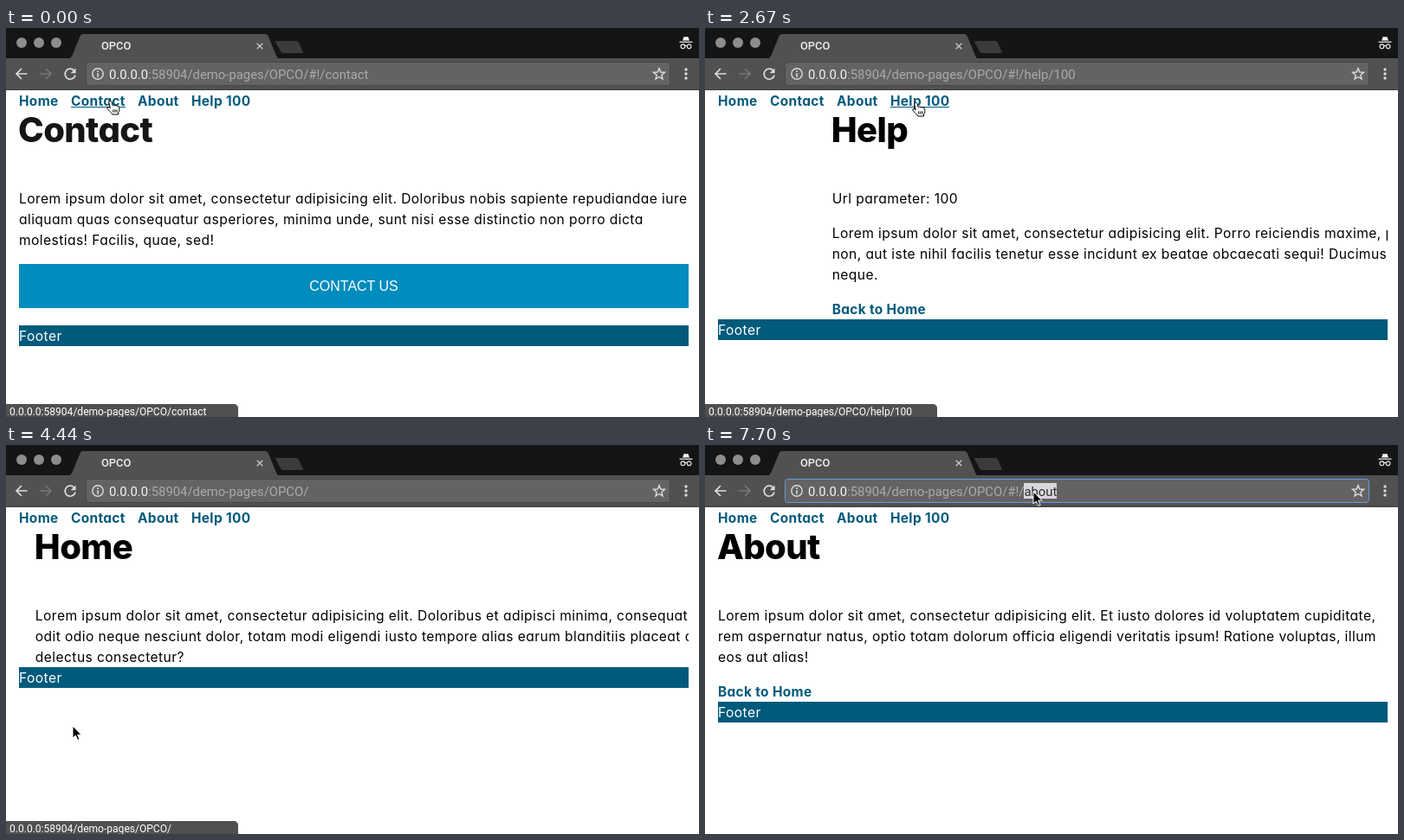
These frames come from a looping animation (800x450 px, 8 s). An HTML page:

```html
<!DOCTYPE html>
<html lang="en">
<head>
<meta charset="utf-8">
<title>One page demo</title>
<style>
  html, body { margin: 0; width: 100%; height: 100%; overflow: hidden; background: #fff; }
  svg { display: block; width: 100vw; height: 100vh; }
  text { white-space: pre; }
  .ui { font-family: Roboto, "Liberation Sans", sans-serif; }
  .body, .bold, .title {
    font-family: Inter, Lato, sans-serif;
    font-feature-settings: "cv11";
    font-optical-sizing: none;
  }
  .body { font-size: 15.6px; letter-spacing: .42px; }
  .bold { font-size: 15.4px; font-weight: 700; letter-spacing: .35px; fill: #005a7c; }
  .title { font-size: 40px; font-weight: 800; letter-spacing: -.6px; }
  .button { font: 16px "Liberation Sans", Arial, sans-serif; fill: #fff; text-anchor: middle; }
  .line { fill: none; stroke: #dcdcdc; stroke-width: 1.7; }
</style>
</head>
<body>
<svg viewBox="0 0 800 450" xmlns="http://www.w3.org/2000/svg">
  <defs><clipPath id="frame"><rect x="15" y="97" width="773" height="340"/></clipPath></defs>
  <rect width="800" height="450" fill="#fff"/>

  <!-- page -->
  <g id="nav"></g>
  <g clip-path="url(#frame)"><g id="page"></g></g>
  <g id="footer">
    <rect x="15" width="773" height="24" fill="#005a7b"/>
    <text class="body" x="15" y="18" fill="#fff">Footer</text>
  </g>

  <!-- window bar -->
  <rect width="800" height="36" fill="#131517"/>
  <g fill="#8d8d8d"><circle cx="18" cy="17" r="6"/><circle cx="38" cy="17" r="6"/><circle cx="58" cy="17" r="6"/></g>
  <path d="M71 36 Q75 35 76.3 32 L85.3 10 Q86.5 7 89.5 7 H299 Q302 7 303 10 L312 32 Q313 35 316 36 Z" fill="#515151"/>
  <path d="M312 15 H335 Q337 15 338 17 L343 28 Q343 29 341 29 H320 Q318 29 317 27 L311 16 Q311 15 312 15 Z" fill="#3b3b3c"/>
  <text class="ui" x="110" y="25" font-size="12.8" font-weight="500" fill="#f0f0f0">OPCO</text>
  <path d="M289.7 17.7 l6.6 6.6 m0 -6.6 l-6.6 6.6" stroke="#c4c4c4" stroke-width="1.4"/>
  <g fill="#f4f4f4">
    <path d="M781 14.4 L782.4 10.4 Q783.2 9.8 785 10.5 Q786.8 9.8 787.6 10.4 L789 14.4 Z"/>
    <rect x="777.5" y="15.6" width="15" height="1.2"/>
    <path d="M779 21.3 a2.4 2.4 0 1 0 4.8 0 a2.4 2.4 0 1 0 -4.8 0 M786.2 21.3 a2.4 2.4 0 1 0 4.8 0 a2.4 2.4 0 1 0 -4.8 0 M783.7 20.8 q1.3 -.8 2.6 0" fill="none" stroke="#f4f4f4" stroke-width="1.1"/>
  </g>

  <!-- toolbar -->
  <rect y="35" width="800" height="36" fill="#515151"/>
  <rect y="71" width="800" height="1" fill="#3c3c3c"/>
  <path class="line" d="M24.5 53 H12.5 M18 47 L12 53 L18 59"/>
  <path class="line" d="M39.5 53 H51.5 M46 47 L52 53 L46 59" style="stroke:#777"/>
  <path class="line" d="M78.6 49.2 A6 6 0 1 0 80 54.5"/>
  <path d="M80.5 46.5 V52.3 H74.7 Z" fill="#dcdcdc"/>
  <rect id="box" x="92.5" y="39.5" width="674" height="27" rx="3" fill="#636363"/>
  <circle class="line" cx="106" cy="53" r="6.2" style="stroke-width:1.4"/>
  <path d="M106 49.3 v1.6 M106 52.2 v4.6" stroke="#e4e4e4" stroke-width="1.5"/>
  <rect id="mark" y="44" height="18" fill="#d9d7dc"/>
  <text class="ui" x="119" y="58.5" font-size="14.85"><tspan id="host">0.0.0.0</tspan><tspan id="path"></tspan><tspan id="word"></tspan></text>
  <path id="star" class="line" style="stroke-width:1.4"/>
  <g fill="#dcdcdc"><circle cx="785" cy="48" r="1.7"/><circle cx="785" cy="53" r="1.7"/><circle cx="785" cy="58" r="1.7"/></g>

  <!-- link address bubble -->
  <g id="bubble">
    <path d="M0 450 V435.5 H263 Q267.5 435.5 267.5 440 V450 Z" fill="#505050" stroke="#505050"/>
    <text class="ui" id="status" x="4" y="448" font-size="12.05" fill="#fff"></text>
  </g>

  <g id="cursor">
    <path id="arrow" d="M0 0 V14 L3.3 11 L5.8 16.4 L8 15.4 L5.6 10.2 H10 Z" fill="#000" stroke="#fff" stroke-width="1" stroke-linejoin="round"/>
    <g id="hand" stroke="#000" stroke-width="1" stroke-linejoin="round" fill="#fff">
      <path d="M-1.7 8.6 L-3.2 2.2 Q-3.3 .2 -1.7 .1 Q-.4 0 0 1.6 L1.2 5.6 Q2.8 4.4 4 5.9 Q5.5 4.9 6.6 6.4 Q8.3 5.8 8.7 7.6 L8.9 10.5 Q8.6 13 7.5 14 V16 H.8 Q-.3 14 -2.4 12.4 L-5 9.4 Q-5.6 7.6 -4 7.4 Q-3 7.4 -1.7 8.6 Z"/>
      <path d="M1.8 10.3 V13.6 M3.9 10.3 V13.6 M6 10.3 V13.6" fill="none"/>
    </g>
  </g>
</svg>
<script>
const $ = id => document.getElementById(id);
const LOOP = 8000, SLIDE = 380, WIDTH = 773;
const LOREM = "Lorem ipsum dolor sit amet, consectetur adipisicing elit. ";

const pages = {
  contact: {
    title: "Contact", ink: "#151515", footer: 344, hash: "#!/", button: true,
    lines: [LOREM + "Doloribus nobis sapiente repudiandae iure",
      "aliquam quas consequatur asperiores, minima unde, sunt nisi esse distinctio non porro dicta",
      "molestias! Facilis, quae, sed!"]
  },
  about: {
    title: "About", footer: 297, hash: "#!/", back: 291,
    lines: [LOREM + "Et iusto dolores id voluptatem cupiditate,",
      "rem aspernatur natus, optio totam dolorum officia eligendi veritatis ipsum! Ratione voluptas, illum",
      "eos aut alias!"]
  },
  "help/100": {
    title: "Help", footer: 337, hash: "#!/", back: 331, lead: "Url parameter: 100",
    lines: [LOREM + "Porro reiciendis maxime, possimus soluta",
      "non, aut iste nihil facilis tenetur esse incidunt ex beatae obcaecati sequi! Ducimus et aut modi",
      "neque."]
  },
  "": {
    title: "Home", footer: 257, hash: "",
    lines: [LOREM + "Doloribus et adipisci minima, consequatur",
      "odit odio neque nesciunt dolor, totam modi eligendi iusto tempore alias earum blanditiis placeat at",
      "delectus consectetur?"]
  }
};

const links = [
  { label: "Home", x: 15, w: 46 },
  { label: "Contact", x: 75, w: 63, to: "contact" },
  { label: "About", x: 152, w: 48, to: "about" },
  { label: "Help 100", x: 214, w: 68, to: "help/100" }
];

// [start, value]
const urls = [[0, "contact"], [990, "about"], [2400, "help/100"], [4020, ""], [5370, "about"]];
const views = [[-999, "contact"], [1060, "about"], [2470, "help/100"], [4137, ""], [5380, "about"]];
const focus = [...urls, [7180, "box"]];
const bubbles = [[0, "contact"], [650, "about"], [1860, "help/100"], [3370, ""], [5200, "about"], [6010, "help/100"]];
const marks = [[0, "none"], [7180, "all"], [7580, "none"], [7690, "word"]];

// [time, value...]
const moves = [[500, 122, 84], [810, 196, 88], [1750, 196, 88], [1980, 245, 86], [2920, 245, 86],
  [3270, 74, 308], [3390, 77, 325], [4830, 77, 325], [5310, 179, 95], [5360, 182, 88], [5790, 182, 88],
  [6330, 361, 75], [6520, 361, 75], [7120, 372, 47], [7350, 372, 47], [7400, 374, 48], [7580, 374, 48], [7690, 379, 54]];
const fades = [[3280, 1], [3370, .5], [3430, 1], [4720, 1], [4920, 0], [5305, 0], [5430, 1], [6475, 1], [6675, 0]];

const current = (list, t) => list.filter(item => item[0] <= t).pop();
const smooth = p => p * p * (3 - 2 * p);

function track(keys, t, curve = p => p) {
  const next = keys.findIndex(key => key[0] > t);
  if (next === 0) return keys[0].slice(1);
  if (next < 0) return keys[keys.length - 1].slice(1);
  const a = keys[next - 1], b = keys[next];
  const p = curve((t - a[0]) / (b[0] - a[0]));
  return a.slice(1).map((v, i) => v + (b[i + 1] - v) * p);
}

// cubic-bezier(.25, .1, .25, 1)
function ease(p) {
  if (p >= 1) return 1;
  const bezier = (s, a, b) => 3 * (1 - s) ** 2 * s * a + 3 * (1 - s) * s * s * b + s ** 3;
  let low = 0, high = 1;
  for (let i = 0; i < 20; i++) {
    const mid = (low + high) / 2;
    if (bezier(mid, .25, .25) < p) low = mid; else high = mid;
  }
  return bezier(low, .1, 1);
}

const label = (cls, x, y, str, fill = "") =>
  `<text class="${cls}" x="${x}" y="${y}"${fill && ` fill="${fill}"`}>${str}</text>`;
const rule = (x, y, w) => `<rect x="${x}" y="${y}" width="${w}" height="1" fill="#005a7c" visibility="hidden"/>`;

function pageMarkup(page) {
  const rows = page.lead ? [page.lead, ...page.lines] : page.lines;
  let out = label("title", 14, 132, page.title, page.ink);
  rows.forEach((row, i) => {
    out += label("body", 15, 203 + 24 * i + (page.lead && i ? 16 : 0), row);
  });
  if (page.button) {
    out += `<rect x="15" y="273" width="773" height="51" fill="#008cbd"/>` + label("button", 401.5, 304, "CONTACT US");
  }
  if (page.back) out += label("bold", 15, page.back, "Back to Home") + rule(15, page.back + 1, 108);
  return out;
}

$("nav").innerHTML = links.map(l => label("bold", l.x, 90, l.label) + rule(l.x, 91, l.w)).join("");
const navRules = $("nav").querySelectorAll("rect");

$("star").setAttribute("d", "M" + Array.from({ length: 10 }, (_, i) => {
  const r = i % 2 ? 3 : 6.8, a = i * Math.PI / 5;
  return `${754 + r * Math.sin(a)} ${53.5 - r * Math.cos(a)}`;
}).join("L") + "Z");

const show = (el, on) => el.setAttribute("visibility", on ? "visible" : "hidden");
let shown = null;

function drawPage(t) {
  const [start, name] = current(views, t);
  const page = pages[name];
  if (shown !== name) {
    $("page").innerHTML = pageMarkup(page);
    $("footer").setAttribute("transform", `translate(0 ${page.footer})`);
    shown = name;
  }
  const offset = WIDTH * (1 - ease((t - start) / SLIDE));
  $("page").setAttribute("transform", `translate(${offset} 0)`);
  return page;
}

function drawPointer(t, page) {
  const [x, y] = track(moves, t, smooth);
  const over = l => y > 74 && y < 95 && x >= l.x && x <= l.x + l.w;
  const onBack = page.back && x >= 15 && x <= 123 && y > page.back - 15 && y < page.back + 5;
  const focused = current(focus, t)[1];
  links.forEach((l, i) => show(navRules[i], over(l) || (l.to && l.to === focused)));
  if (page.back) show($("page").lastElementChild, onBack);
  const hand = links.some(over) || onBack;
  show($("hand"), hand);
  show($("arrow"), !hand);
  $("cursor").setAttribute("transform", `translate(${x} ${y})`);
}

function drawAddress(t) {
  const name = current(urls, t)[1];
  const mark = current(marks, t)[1];
  const dark = "#2e2e2e";
  $("path").textContent = ":58904/demo-pages/OPCO/" + pages[name].hash;
  $("word").textContent = name;
  $("host").setAttribute("fill", mark === "all" ? dark : "#f4f4f4");
  $("path").setAttribute("fill", mark === "all" ? dark : "#ababab");
  $("word").setAttribute("fill", mark === "none" ? "#ababab" : dark);
  const left = mark === "all" ? 119 : 368;
  $("mark").setAttribute("x", left);
  $("mark").setAttribute("width", 406 - left);
  show($("mark"), mark !== "none");
  $("box").setAttribute("stroke", current(focus, t)[1] === "box" ? "#6a98e0" : "#474747");
}

function draw(t) {
  drawPointer(t, drawPage(t));
  drawAddress(t);
  $("status").textContent = "0.0.0.0:58904/demo-pages/OPCO/" + current(bubbles, t)[1];
  $("bubble").setAttribute("opacity", track(fades, t)[0]);
}

const begin = performance.now();
function tick() {
  draw((performance.now() - begin) % LOOP);
  requestAnimationFrame(tick);
}
tick();
</script>
</body>
</html>
```
